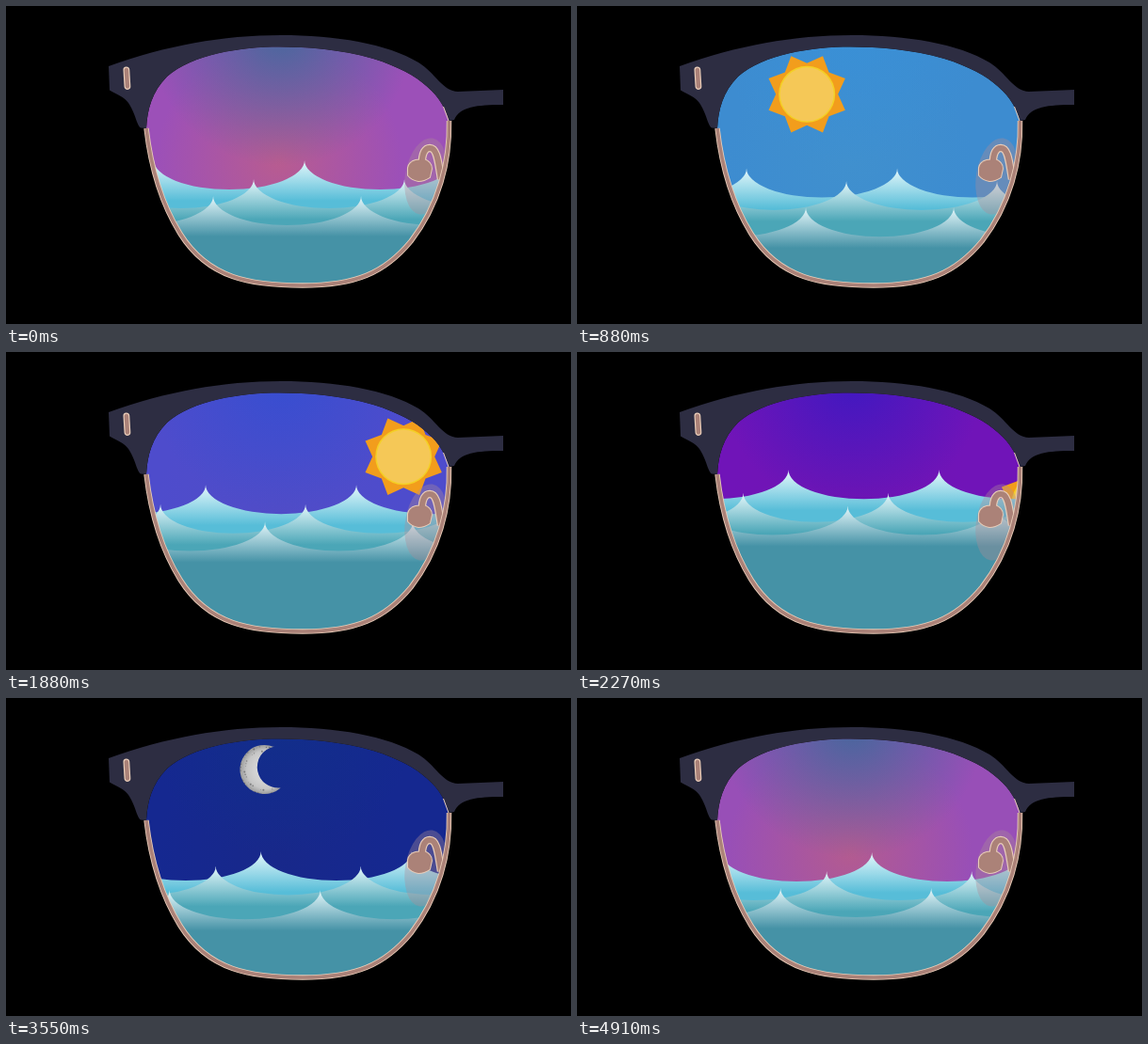
An HTML page with a canvas that plays this animation: 600 by 338 pixels, repeating every 4.94 s.

```html
<!DOCTYPE html>
<html lang="en">
<head>
<meta charset="utf-8">
<title>Day and night through a lens</title>
<style>
  html, body { margin: 0; overflow: hidden; background: #000; }
  canvas { display: block; }
</style>
</head>
<body>
<canvas id="stage" width="600" height="338"></canvas>
<script>
const ctx = document.getElementById('stage').getContext('2d');
const LOOP = 4940, TAU = Math.PI * 2;
const NAVY = '#2d2d42', ROSE = '#ab8278', PALE = '#e9cdb9';

// Outlines
const rimCurve = 'C153 165 162 205 185 242 C215 290 260 297 315 297 C371 297 402 284 430 250 C460 211 471.5 165 470.5 122';
const browCurve = 'C464 97 442 72 390 56 C355 46 320 43.5 290 43.5 C250 43.5 198 51 171 75 C155 91 150 110 149 130';
const rim = new Path2D('M149 130' + rimCurve);
const lens = new Path2D('M149 130' + rimCurve + browCurve + 'Z');
const brow = new Path2D('M470.5 122' + browCurve +
  'L143 129.5 C139 127 137 113 130 103 C126 97 118 94 110 89.5 L109 64 C170 42 230 31 292 31 C350 31 405 40 438 60 C456 71 464 91 480 91 L528 89 V105 C500 105 482 107 476 121 Z');
const rimTip = new Path2D('M464.5 107 L470 122');
const hook = new Path2D('M442 170 C441 155 446 151 450 151 C458 151 459 166 462 184');
const knob = new Path2D('M427 172 Q428 166 435 164 L444 163 Q452 166 452 173 L450 182 Q444 186 438 186 Q431 185 427 180 Z');

// Motion: [time, value...]
const driftKeys = [[0, 0], [880, 23], [2270, 67.5], [3550, 113.7], [4240, 136.5], [LOOP, 157]];
const bobTimes = [0, 1040, 2470, 4000, LOOP];

const waves = [
  { x: 317, left: 160, right: 160, y: 164, low: 9, high: -41, color: '#57bdd8' },
  { x: 263, left: 154, right: 160, y: 184, low: 2, high: -36, color: '#4ba6b7' },
  { x: 220, left: 160, right: 157, y: 202, low: 13, high: -41, color: '#4592a6' },
];

// Sky: [time, top glow rgb, base rgb, low glow rgb]
const skyKeys = [
  [0, 72, 104, 156, 156, 80, 184, 184, 92, 144],
  [880, 58, 144, 214, 61, 140, 208, 64, 144, 206],
  [1520, 46, 128, 222, 46, 128, 222, 50, 128, 218],
  [2270, 64, 24, 192, 112, 20, 184, 112, 20, 178],
  [3550, 18, 46, 138, 21, 40, 144, 24, 40, 138],
  [4240, 32, 82, 156, 66, 62, 150, 72, 58, 146],
];
skyKeys.push([LOOP, ...skyKeys[0].slice(1)]);

const linear = u => u;
const easeInOut = u => (1 - Math.cos(u * Math.PI)) / 2;

function sample(keys, t, ease = linear) {
  const i = Math.max(1, keys.findIndex(k => k[0] > t));
  const a = keys[i - 1], b = keys[i];
  const u = ease((t - a[0]) / (b[0] - a[0]));
  return a.slice(1).map((v, n) => v + (b[n + 1] - v) * u);
}

function glow(x, y, r, rgb) {
  const g = ctx.createRadialGradient(x, y, 0, x, y, r);
  g.addColorStop(0, `rgba(${rgb},1)`);
  g.addColorStop(1, `rgba(${rgb},0)`);
  ctx.fillStyle = g;
  ctx.fillRect(100, 20, 400, 290);
}

function drawSky(t) {
  const c = sample(skyKeys, t).map(Math.round);
  ctx.fillStyle = `rgb(${c.slice(3, 6)})`;
  ctx.fillRect(100, 20, 400, 290);
  glow(290, 165, 130, c.slice(6));
  glow(292, 30, 140, c.slice(0, 3));
}

function disc(x, y, r) {
  ctx.beginPath();
  ctx.arc(x, y, r, 0, TAU);
  ctx.fill();
}

function at(x, y, draw) {
  ctx.save();
  ctx.translate(x, y);
  draw();
  ctx.restore();
}

function drawSun(t) {
  const x = 244 + 0.178 * (t - 880);
  at(x, 82 + 0.00247 * (x - 313.4) ** 2, () => {
    ctx.fillStyle = '#f29d1c';
    ctx.beginPath();
    for (let i = 0; i < 16; i++) {
      const r = i % 2 ? 44 : 33, a = i * TAU / 16;
      ctx.lineTo(r * Math.cos(a), r * Math.sin(a));
    }
    ctx.fill();
    ctx.fillStyle = '#f4cf25';
    disc(0, 0, 30);
    ctx.fillStyle = '#f5c857';
    disc(0, 0, 28.5);
  });
}

function drawMoon(t) {
  const x = 274.2 + 0.2 * (t - 3550);
  const deg = TAU / 360;
  at(x, 73 + 0.00202 * (x - 313) ** 2, () => {
    ctx.beginPath();
    ctx.arc(0, 0, 26, 49 * deg, 293 * deg);
    ctx.arc(14.6, -2.6, 22.2, 258.6 * deg, 83.7 * deg, true);
    const shade = ctx.createRadialGradient(4, 0, 12, 0, 0, 26);
    shade.addColorStop(0, '#d6d6d6');
    shade.addColorStop(0.6, '#c6c6c6');
    shade.addColorStop(1, '#9c9c9c');
    ctx.fillStyle = shade;
    ctx.fill();
    ctx.clip();
    ctx.fillStyle = 'rgba(75,75,78,.55)';
    for (let i = 1; i < 60; i++) {
      const a = i * 2.4, r = 18 + (i * 7.3) % 9;
      disc(r * Math.cos(a), r * Math.sin(a), 0.4 + (i % 4) * 0.2);
    }
  });
}

function drawWave(w, t) {
  const x = w.x + sample(driftKeys, t)[0];
  const bob = [0, w.low, w.high, w.low, 0].map((v, i) => [bobTimes[i], v]);
  const y = w.y + sample(bob, t, easeInOut)[0];
  const fill = ctx.createLinearGradient(0, y, 0, y + 43);
  fill.addColorStop(0, '#e6f8fb');
  fill.addColorStop(1, w.color);
  ctx.fillStyle = fill;
  ctx.beginPath();
  for (let i = -3; i < 3; i++) {
    const span = i < 0 ? w.left : w.right;
    ctx.ellipse(x + (i + 0.5) * span, y, span / 2, 31, 0, Math.PI, 0, true);
  }
  ctx.lineTo(x + 3 * w.right, 310);
  ctx.lineTo(x - 3 * w.left, 310);
  ctx.fill();
}

function strokePath(path, width, color) {
  ctx.lineWidth = width;
  ctx.strokeStyle = color;
  ctx.stroke(path);
}

function drawNosePad() {
  ctx.fillStyle = 'rgba(172,140,150,.36)';
  ctx.beginPath();
  ctx.ellipse(446, 181, 22, 41, 0.17, 0, TAU);
  ctx.fill();
  strokePath(hook, 8.5, PALE);
  strokePath(knob, 2, PALE);
  strokePath(hook, 6.2, ROSE);
  ctx.fillStyle = ROSE;
  ctx.fill(knob);
}

function drawFrame() {
  strokePath(rim, 5.4, PALE);
  strokePath(rim, 3.6, ROSE);
  ctx.fillStyle = NAVY;
  ctx.fill(brow);
  strokePath(rimTip, 1, PALE);
  at(128.4, 76.7, () => {
    ctx.rotate(-0.06);
    ctx.beginPath();
    ctx.roundRect(-2.8, -11.6, 5.6, 23.2, 2.8);
    ctx.fillStyle = ROSE;
    ctx.fill();
    ctx.lineWidth = 1.2;
    ctx.strokeStyle = PALE;
    ctx.stroke();
  });
}

function render(now) {
  const t = now % LOOP;
  ctx.clearRect(0, 0, 600, 338);
  ctx.save();
  ctx.clip(lens);
  drawSky(t);
  drawSun(t);
  drawMoon(t);
  waves.forEach(w => drawWave(w, t));
  drawNosePad();
  ctx.restore();
  drawFrame();
}

const start = performance.now();
(function tick() {
  render(performance.now() - start);
  requestAnimationFrame(tick);
})();
</script>
</body>
</html>
```
